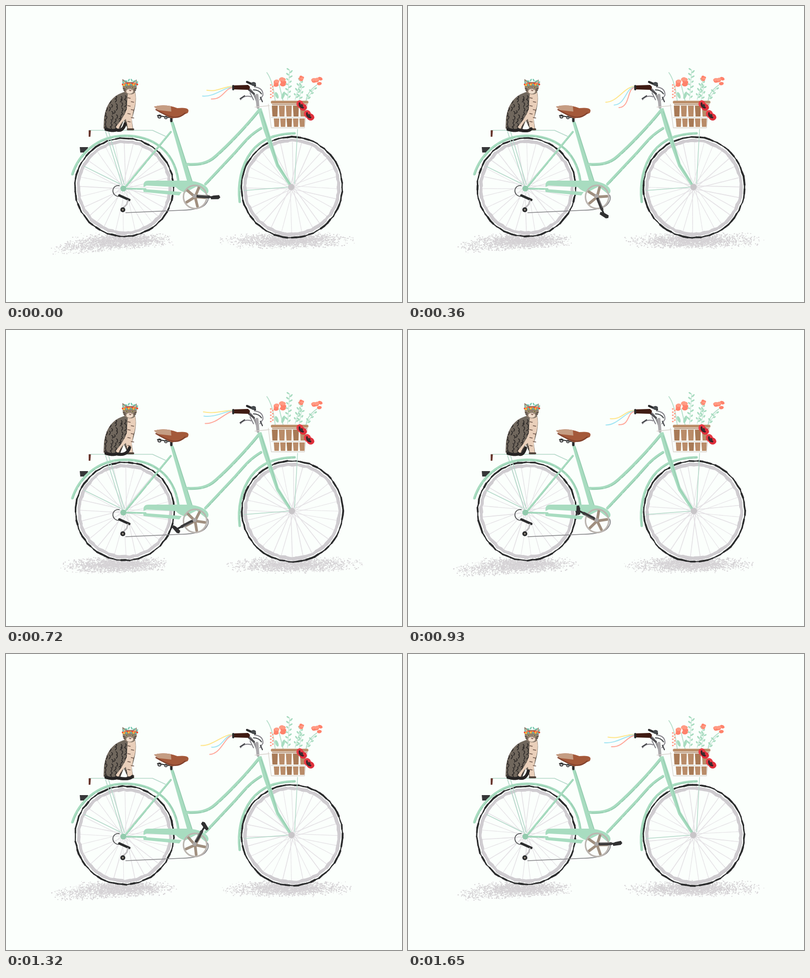
An HTML page with a canvas for the animation above (1.68 s loop, 800x600 px).

```html
<!DOCTYPE html>
<html lang="en">
<head>
<meta charset="utf-8">
<title>Bicycle ride</title>
<style>
html, body { margin: 0; width: 100%; height: 100%; overflow: hidden; background: #fbfffc; }
canvas { display: block; }
</style>
</head>
<body>
<canvas id="stage" width="800" height="600"></canvas>
<script>
const c = document.getElementById('stage').getContext('2d');
const LOOP = 1680, STEP = 30, TAU = Math.PI * 2;
const PAPER = '#fbfffc', MINT = '#a8dcc0', SHADE = '#92caad', PALE = '#b5d9ca', INK = '#2b2c2d', CORAL = '#ff826b';
const mix = (a, b, u) => a + (b - a) * u;
// Swing around a middle value, highest at the given phase (0 to 1).
const swing = (phase, mid, reach, peak) => mid + reach * Math.cos(TAU * (phase - peak));

function seeded(seed) {
  return () => {
    seed = seed + 0x6D2B79F5 | 0;
    let t = Math.imul(seed ^ seed >>> 15, 1 | seed);
    t = t + Math.imul(t ^ t >>> 7, 61 | t) ^ t;
    return ((t ^ t >>> 14) >>> 0) / 4294967296;
  };
}
function stroke(d, color, width = 1, dash = []) {
  c.strokeStyle = color;
  c.lineWidth = width;
  c.setLineDash(dash);
  c.stroke(new Path2D(d));
  c.setLineDash([]);
}
function fill(d, color) {
  c.fillStyle = color;
  c.fill(new Path2D(d));
}
function oval(x, y, rx, ry, color, turn = 0) {
  c.fillStyle = color;
  c.beginPath();
  c.ellipse(x, y, rx, ry, turn, 0, TAU);
  c.fill();
}
function ring(x, y, r, color, width) {
  c.strokeStyle = color;
  c.lineWidth = width;
  c.beginPath();
  c.arc(x, y, r, 0, TAU);
  c.stroke();
}
function turned(x, y, angle, paint) {
  c.save();
  c.translate(x, y);
  c.rotate(angle);
  paint();
  c.restore();
}
// A painted tube with a darker brush line along one side.
function tube(d, width) {
  stroke(d, MINT, width);
  c.save();
  c.translate(width * .3, width * .2);
  stroke(d, SHADE, width * .25, [23, 3, 9, 5]);
  c.restore();
}

function shadow(left, right, contact, seed, droop) {
  const rnd = seeded(seed);
  c.fillStyle = '#d5d2d5';
  for (let i = 0; i < 2300; i++) {
    const core = i > 1300, u = (rnd() + rnd()) / 2;
    const x = core ? contact + (rnd() + rnd() + rnd() - 1.5) * 75 : mix(left, right, u);
    const spread = core ? 15 : 20 * Math.sqrt(u * (1 - u)) + 8;
    const y = 474 + (core ? 0 : droop * (1 - u) ** 2) + (rnd() + rnd() - 1) * spread;
    const s = .8 + rnd() * 1.3;
    c.fillRect(x, y, s * 1.3, s);
  }
}

function wheel(x, y, r, angle, seed) {
  const rnd = seeded(seed), n = 72;
  const bump = Array.from({ length: n }, () => rnd() - .5);
  const rim = (offset, rough, color, width, vary) => {
    const at = i => {
      const q = r + offset + bump[i % n] * rough, a = i / n * TAU;
      return `${q * Math.cos(a)} ${q * Math.sin(a)}`;
    };
    for (let i = 0; i < n; i++) stroke(`M${at(i)}L${at(i + 1)}`, color, width + rnd() * vary);
  };
  turned(x, y, angle, () => {
    for (let i = 0; i < 28; i++) {
      const a = i / 28 * TAU + (rnd() - .5) * .07, b = a + (i % 2 ? .5 : -.5);
      stroke(`M${6 * Math.cos(b)} ${6 * Math.sin(b)}L${(r - 11) * Math.cos(a)} ${(r - 11) * Math.sin(a)}`, '#e4e1e5', 1 + rnd() * .7, [17, 1, 8, 1]);
    }
    rim(-8, 2, '#cfccd0', 5, 2.5);
    rim(-1, 1.5, INK, 2, 2);
  });
}

function frameTubes() {
  // Rack, lamps and stays
  stroke('M168 252H296L322 264M201 254L235 364M207 254L239 362M158 325L231 361', PALE, 1.6);
  stroke('M589 250L583 360M481 374L572 367', PALE, 1.5);
  fill('M167 252h4.5l-1 13h-3.5z', '#6a3930');
  fill('M149 286h17l-4 11h-12z', '#363638');

  // Fenders
  tube('M134 341C145 306 180 263 240 263C292 263 339 289 348 354', 5);
  tube('M472 397C468 363 474 324 496 295C514 272 540 259 583 258', 5);

  // Tubes
  tube('M333 255L240 368', 4);
  tube('M238 370L282 371', 3.5);
  oval(237, 370, 6, 6, SHADE);
  fill('M332 235L338 234 377 357 367 359z', MINT);
  stroke('M338 237L376 355', SHADE, 1.5);
  tube('M509 214C486 243 449 282 424 304C407 320 389 322 367 321', 6);
  tube('M515 248C492 262 484 273 462 298L403 361', 5.5);
  fill('M508 208L516 207 528 244 551 320 578 364 573 366 546 325 520 251z', MINT);
  stroke('M516 214L549 322 575 362', SHADE, 1.3);

  // Chain guard
  fill('M278 367Q276 354 288 354H370Q398 357 407 369Q412 377 405 382L385 366 362 378Q350 375 343 367L284 364z', MINT);
  fill('M277 371L355 377 350 384 278 377z', MINT);
}

function drivetrain() {
  stroke('M242 419L355 414Q394 413 403 402T407 383', '#858488', 1.7);
  stroke('M229 364C213 362 211 384 227 386', '#535456', 1.7);
  stroke('M229 384L249 393', INK, 5);
  stroke('M246 394L244 402 238 408', '#bcbabd', 3);
  oval(236, 413, 5, 5, INK);
  oval(236, 413, 1.7, 1.7, '#aaa093');
}

function crank(p) {
  const turn = p * TAU, angle = turn + .07 - .23 * Math.sin(turn);
  const tilt = turn - .09 - .95 * (1 - Math.cos(turn));
  const x = 381, y = 385;
  turned(x + 1, y + 2, angle, () => {
    for (let i = 0; i < 5; i++) {
      c.rotate(TAU / 5);
      stroke('M4 0H20', '#a08f7f', 5.5);
    }
  });
  ring(x + 1, y + 2, 23.5, '#bbb5b0', 3);
  turned(x, y, angle, () => {
    stroke('M2 0H40', INK, 3.5);
    stroke('M7 0H29', '#3b3a3b', 6);
    stroke('M7 -2H26', '#918e8e', 1);
  });
  oval(x, y, 4, 4, '#aaa6a4');
  turned(x + 42 * Math.cos(angle), y + 42 * Math.sin(angle), tilt, () => fill('M-10 -2L-4 -4 8 -4 10 1 6 4 -9 3z', '#303031'));
}

function saddle() {
  stroke('M334 224V233', INK, 5);
  stroke('M306 222L330 226', INK, 2);
  ring(310, 224, 3, '#3b3b3c', 2);
  ring(323, 226, 2.5, '#4b4a4b', 2);
  fill('M299 204Q322 198 346 207Q375 204 367 217Q350 224 336 228Q316 221 299 204z', '#a4593a');
  fill('M299 204Q315 199 333 203L334 214 307 211z', '#c59d83');
  stroke('M303 210Q322 222 336 225T362 217', '#83432e', 2.5);
}

function handlebar() {
  stroke('M474 190Q481 180 495 184M493 176L500 190M502 164Q520 166 519 181L513 190', '#85838a', 2);
  stroke('M488 166Q499 169 508 197', '#8f8d91', 3.5);
  stroke('M473 188L482 182M514 185L518 194M500 170Q511 170 516 178', '#45474b', 2.2);
  stroke('M507 181L509 205', '#aaa8ab', 6);
  stroke('M487 154L503 161', INK, 4.5);
  oval(500, 158, 5, 4, '#474b4e');
  stroke('M491 170L501 178', '#504f53', 4);
  fill('M458 161L489 160 493 164 491 170 458 169z', '#3f1b13');
  stroke('M459 162V169', INK, 4);
}

function ribbon(i, color, x, y) {
  const oy = 163 + i;
  stroke(`M458 ${oy}C${438 + i * 2} ${oy + i} ${x + 23} ${mix(oy, y, .85) + 5} ${x} ${y}`, color, 2);
}
function ribbons(p) {
  ribbon(0, '#ffe68c', swing(p, 401, 8, .15), swing(p, 181, 15, .37));
  ribbon(1, '#a3e5f3', swing(p, 407, 10, .48), swing(p, 189, 15, .32));
  ribbon(2, '#ffa799', swing(p, 417, 17, .27), swing(p, 197, 9, .45));
}

function sprig(x0, y0, x1, y1) {
  const rnd = seeded(x1), leaves = Math.round((y0 - y1) / 5);
  stroke(`M${x0} ${y0}L${x1} ${y1}`, '#b6dfcb', 1.2);
  for (let i = 1; i <= leaves; i++) {
    const u = i / leaves, side = i % 2 ? 1 : -1;
    oval(mix(x0, x1, u) + side * 3.5, mix(y0, y1, u) - 1, 2.5 + rnd() * 1.5, 1.6, MINT, -side * (.5 + rnd() * .6));
  }
}
function bloom(x, y, r) {
  const rnd = seeded(x);
  for (let i = 0; i < 10; i++) {
    oval(x + (rnd() - .5) * r * 1.3, y + (rnd() - .5) * r, r * .4, r * .28, i % 3 ? CORAL : '#ff9b84', (rnd() - .5) * .8);
  }
}
function poppy(x, y) {
  oval(x - 3, y - 3, 7, 8, '#e93b45', -.4);
  oval(x + 3, y + 3, 8, 7, '#df2f3b', .4);
  stroke(`M${x - 4} ${y - 5}Q${x - 5} ${y + 3} ${x + 3} ${y + 4}`, '#342326', 3.5);
  oval(x, y, 3, 3, '#3c3031');
}

function basket() {
  stroke('M527 135Q539 151 544 193M552 160L560 193M628 160Q608 174 606 193', '#b6dfcb', 1.8);
  sprig(569, 190, 573, 129);
  sprig(584, 190, 596, 150);
  sprig(592, 192, 598, 160);
  sprig(606, 192, 622, 168);
  oval(547, 181, 3, 7, MINT, -.4);
  oval(560, 181, 3, 8, MINT, .35);
  bloom(554, 154, 13);
  bloom(628, 153, 12);
  bloom(595, 147, 8);
  for (let i = 0; i < 9; i++) oval(535 + i % 2 * 4, 160 + i * 3.2, 1.8, 1.5, '#ff9985');

  for (let row = 0; row < 2; row++) {
    for (let i = 0; i < 5; i++) {
      const x = mix(537, 541, row) + i * mix(14.2, 12.9, row), tall = 22 - row * 5;
      fill(`M${x} ${202 + row * 26}h${12 - row}l-.7 ${tall}h${row - 10}z`, (i + row) % 3 ? '#b98c69' : '#a87a56');
    }
  }
  stroke('M538 195H608', '#bc906c', 6);
  stroke('M538 200H608', '#a27350', 1.3);
  stroke('M503 205L532 202M530 199L536 247H603L609 198M536 226H606', '#d9d3ce', 1.3);
  poppy(597, 202);
  poppy(612, 222);
}

function cat(p) {
  const fur = '#70675d', dark = '#302c2a', rnd = seeded(4);
  const body = 'M240 174C215 181 202 199 198 228L197 248Q205 254 220 254L231 253 238 232 246 251 257 250 254 230C260 211 265 192 261 174z';
  fill(body, fur);
  c.save();
  c.clip(new Path2D(body));
  for (let y = 180; y < 250; y += 8) {
    for (let x = 199; x < 244; x += 10) {
      stroke(`M${x + rnd() * 5} ${y + rnd() * 4}q4 2 ${2 - rnd() * 5} ${5 + rnd() * 3}`, dark, 1.8);
    }
  }
  c.restore();
  fill('M246 177Q254 182 261 175Q264 197 257 213L254 232 256 249 247 250 242 229 234 236 226 251 222 245Q238 226 244 209z', '#e9cfba');
  for (let i = 0; i < 7; i++) stroke(`M${i % 2 ? 253 : 246} ${186 + i * 8}l5 1`, '#6d564a', 1.6);
  fill('M238 233L245 247 231 249z', PAPER);
  stroke('M246 250H257', '#54473e', 4);

  fill('M236 168L235 148 245 154H256L264 149V167Q260 179 250 179T236 168z', '#8f7e6e');
  oval(250, 173, 7, 5, '#efdccb');
  for (const side of [-1, 1]) {
    const x = 250 + side * 6;
    fill(`M${x + side * 7} 151l${-side * 6} 6l${side * 5} 3z`, '#e7b9a3');
    oval(x, 165, 2, 1.5, '#c6bd6d');
    oval(x, 165, .8, 1.3, dark);
    stroke(`M${x + side * 3} 169l${side * 4} -2m${-side * 4} 5l${side * 3} -1`, dark, 1.2);
  }
  stroke('M249 170L251 172 253 170', '#745047', 1.3);

  const wreath = ['#ef4932', '#ffc73e', '#f26f38', '#66bea8'];
  for (let i = 0; i < 13; i++) {
    const u = i / 12, lift = Math.sin(u * Math.PI);
    oval(236 + u * 29, 159 - lift * 2 + i % 2 * 2, 2.1, 2.1, wreath[i % 4]);
    if (i % 2) oval(234 + u * 34, 157 - lift * 7, 3, 1.4, '#76c9b0', i - 6);
  }

  const x = swing(p, 247, 10, .65), y = swing(p, 243, 6, .46);
  const tail = `M202 250Q217 254 223 251Q${x - 5} 256 ${x} ${y}`;
  stroke(tail, '#5a5048', 6);
  stroke(tail, '#262424', 6, [6, 2]);
}

function draw(t) {
  c.fillStyle = PAPER;
  c.fillRect(0, 0, 800, 600);
  c.lineCap = c.lineJoin = 'round';
  const turn = t / LOOP, sway = t / 840 % 1;

  // The ground flickers through seven paintings, four times in a loop.
  const pose = Math.floor(t % 420 / 60), drift = pose / 7;
  shadow(swing(drift, 96, 11, .62), swing(drift, 340, 16, .32), 235, 11 + pose, swing(drift, 8, 12, 0));
  shadow(swing(drift, 437, 9, .5), swing(drift, 714, 12, .7), 573, 71 + pose, 3);

  const wobble = -Math.cos(turn * TAU) * .7;
  wheel(239.5 + wobble, 367.5, 100.5, turn * TAU, 5);
  wheel(578 + wobble, 367.5, 103, turn * TAU, 9);
  frameTubes();
  oval(577 + wobble, 367, 6.5, 6.5, '#c8c5c8');
  drivetrain();
  crank(turn);
  saddle();
  ribbons(sway);
  handlebar();
  basket();
  cat(sway);
}

let shown = -1;
function tick() {
  const step = Math.floor(performance.now() % LOOP / STEP);
  if (step !== shown) draw((shown = step) * STEP);
  requestAnimationFrame(tick);
}
tick();
</script>
</body>
</html>
```
